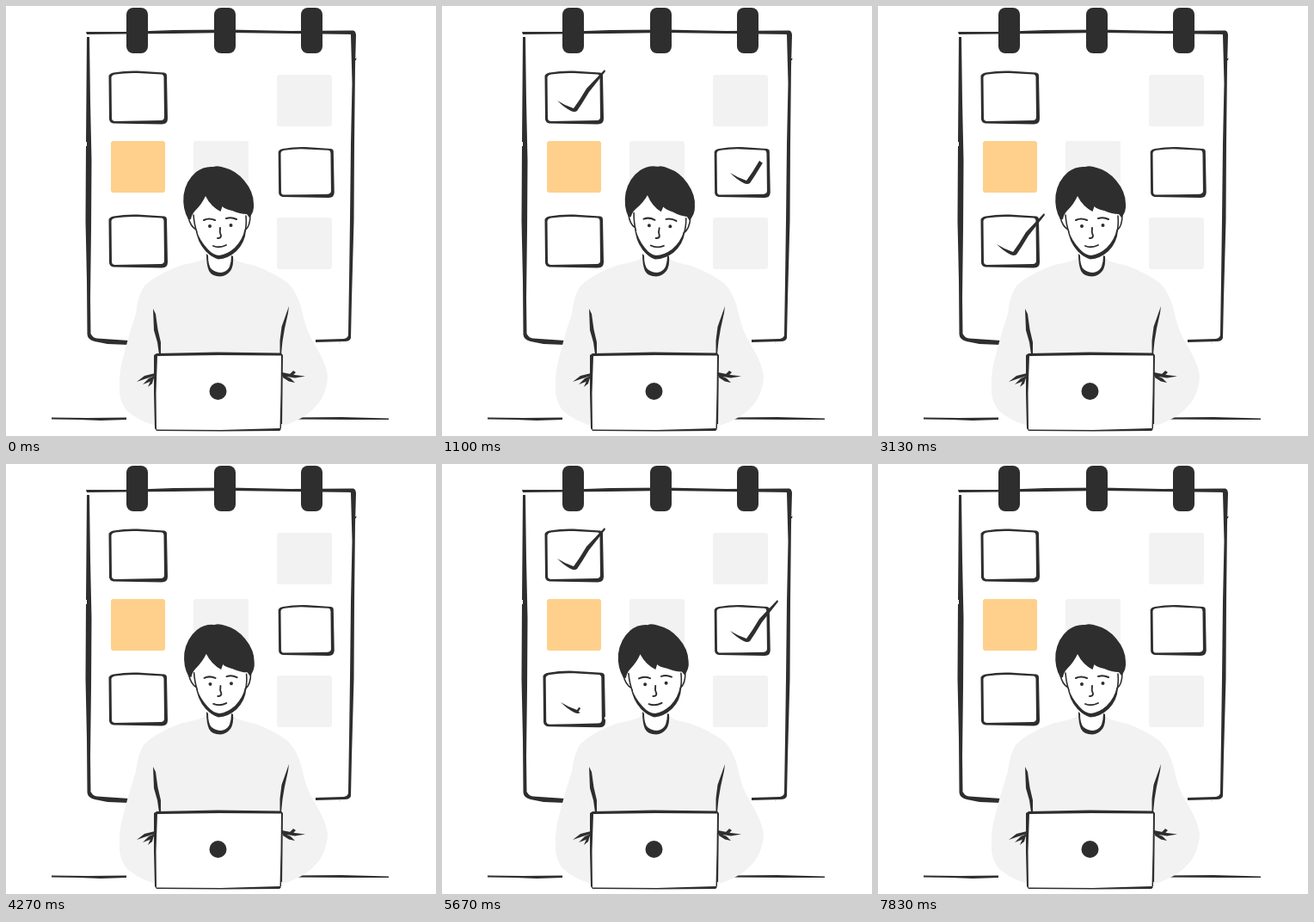
These frames come from a looping animation (500x500 px, 8.23 s). An HTML page:

```html
<!DOCTYPE html>
<html lang="en">
<head>
<meta charset="utf-8">
<title>Checklist</title>
<style>
  html, body { margin: 0; width: 100%; height: 100%; overflow: hidden; background: #fff; }
  svg { display: block; width: 100vw; height: 100vh; }
  .ink { fill: #2e2e2e; }
  .pale { fill: #f2f2f2; }
  .white { fill: #fff; }
  .line { fill: none; stroke: #2e2e2e; stroke-width: 2; stroke-linecap: round; stroke-linejoin: round; }
</style>
</head>
<body>
<svg viewBox="0 0 500 500">
  <defs>
    <filter id="rough" filterUnits="userSpaceOnUse" x="0" y="0" width="500" height="500" color-interpolation-filters="sRGB">
      <feTurbulence type="fractalNoise" baseFrequency=".06" numOctaves="2" seed="4"/>
      <feDisplacementMap in="SourceGraphic" scale="1.6" xChannelSelector="R" yChannelSelector="G"/>
    </filter>
    <path id="box" class="ink" fill-rule="evenodd" d="M-33.500-25Q-32-28-28-28.500Q-14-31 0-30.500L31-28.500Q34-28 34-25L35 25Q35 31.500 28 31.500L0 31L-28 30.500Q-32 30-33 26Z
      M-30.500-23Q-30-26-26-26.500Q-14-28.500 0-28L28-26.500Q30.500-26 30.500-23L31 23Q31 27 27 27L0 27.500L-26 28Q-29.500 28-30 25Z"/>
    <path id="check" class="ink" d="M134 110L143 115L153 119L160 109L168 96L189 74L190 76L171 100L163 113L157 122Q154 124 150 122Q142 118 134 110Z"/>
  </defs>

  <!-- board -->
  <g class="ink" filter="url(#rough)">
    <path d="M93 30L140 30L195 28L260 27.500L330 29L403 28.500L406 30V33L330 32L260 31L195 32L140 32.500L94 33Z"/>
    <path d="M94 36H97L98 110L99.500 180L99 260L98 340L98.500 381Q101 386 106 386.500L143 389V394L118 393L103 390Q95 388 94.500 382L94 320L92.500 250L93 160Z"/>
    <path d="M400 30L404 28.500Q407 30 407 34L406 70L405 160L404.500 250L402 340L401 386Q400 390 394 390L360 391V388L393 387Q398 386 398 382L399 320L400 250L401 160L402.500 90L401 34Z"/>
  </g>
  <g class="ink">
    <rect x="140" y="2" width="25" height="53" rx="8"/>
    <rect x="242" y="2" width="25" height="53" rx="8"/>
    <rect x="343" y="2" width="25" height="53" rx="8"/>
  </g>
  <g class="pale">
    <rect x="315" y="80" width="64" height="60" rx="3"/>
    <rect x="218" y="157" width="64" height="60" rx="3"/>
    <rect x="315" y="246" width="64" height="60" rx="3"/>
    <rect x="122" y="157" width="63" height="60" rx="3" fill="#fed08b"/>
  </g>
  <g id="tasks"></g>

  <!-- desk -->
  <path class="ink" filter="url(#rough)" d="M53 478.500L95 479L140 478.500V481L110 482L85 481L53 480.500ZM334 478.500L390 478L445 479.500V481L400 481L334 480.500Z"/>

  <!-- body -->
  <path class="pale" d="M234 292Q228 297 205 301Q172 313 160 327Q153 338 151 358Q144 378 138 402Q131 425 132 442Q131 458 140 470Q153 482 174 488H322Q350 480 365 460Q374 445 374 430Q372 415 358 392Q349 378 344 354Q338 330 325 320Q300 303 277 299Q265 296 263 291Z"/>
  <path class="white" d="M234 280V295Q235 311 249 311Q262 310 263 293V280Z"/>
  <path class="ink" d="M233 288L235 290Q235 302 239 306Q244 310 250 310Q257 309 260 303Q262 297 262 290L264 291Q265 302 261 308Q256 314 249 314.500Q239 314 236 308Q233 301 233 288Z"/>
  <path class="ink" d="M171 352L174 358L176.500 376L180 391L180 405H178L176 391L172 377ZM329 349L328 357L324 375L321.500 390L320 405H318.500L318.500 389L320.500 373Z"/>

  <!-- head -->
  <g id="head">
    <path class="white" d="M211 238L213 249Q215 257 221 260Q224 273 233 283Q240 292 247 292.500Q258 291 266 284Q276 274 278 261Q285 253 284 238L250 215Z"/>
    <path class="line" d="M212 245Q214 256 221 260M218 243Q219 255 222 263M284 243Q284 256 278 261M279 244Q280 254 278 262" style="stroke-width:1.600"/>
    <path class="ink" d="M220 257L222 262Q225 272 234 282Q241 290 248 290Q257 289 266 281Q275 272 277.500 260L279 261Q278 275 268 285Q258 294 247 294.500Q240 293 232 285Q222 274 220 257Z"/>
    <path class="ink" d="M212 248Q205 236 206.500 220Q209 203 221 193Q230 186 241 187Q246 185 254 188Q267 191 277 203Q288 216 288 230Q289 239 283 246L280 242Q272 242 263 238Q254 236 251.500 233L249.500 239Q238 233 232 221Q228 230 220 238Q216 242 215 248Z"/>
    <path class="line" d="M230 249Q236 246 243 249M256 247Q262 245 268 248"/>
    <circle class="ink" cx="237" cy="256" r="2"/>
    <circle class="ink" cx="261.500" cy="255" r="2"/>
    <path class="line" d="M249 258Q248 263 250 267Q250 270 246 270M241 279Q248 282 256 278" style="stroke-width:1.900"/>
  </g>

  <!-- laptop and hands -->
  <path class="white" d="M174 405L322 404L320 492L174 493Z"/>
  <g class="ink" filter="url(#rough)">
    <path fill-rule="evenodd" d="M172 406L175 404L246 402.500L320 403.500L322 406L321.500 450L321 491L318 494L250 494.500L175 494L173 491L172 450ZM176 407L174.500 450L175 492.500L250 493L318.500 491L319.500 450L320 406.500L248 406Z"/>
    <path d="M152 437L161 430L173 427V430L162 433.500ZM159 440L166 433L173 430V432L167 437ZM165 443L168 436L172 432L170 439ZM321 426L336 429L348 430.500L336 432.500L321 430ZM322 429L331 433L336 438L329 436.500L322 432ZM329 429L334 424L337 426L333 430Z"/>
  </g>
  <circle class="ink" cx="246.500" cy="448" r="10"/>
</svg>
<script>
  const LOOP = 8230, HALF = 4100;
  // box centre and scale, tick offset, start of drawing and of erasing
  const tasks = [
    { box: [153, 106, 1, 1], tick: [0, 0], draw: 250, erase: 2100 },
    { box: [348.5, 193, .95, .95], tick: [201, 84], draw: 850, erase: 2700 },
    { box: [153, 273, 1, 1], tick: [4, 167], draw: 1450, erase: 3300 }
  ];
  // head turns: from time, to time, degrees added
  const turns = [[50, 600, 5], [1100, 1750, -7.5], [2300, 2900, 2.5]];

  const root = document.getElementById('tasks');
  const head = document.getElementById('head');
  root.innerHTML = tasks.map(({ tick }, i) => `
    <mask id="m${i}" maskUnits="userSpaceOnUse" x="0" y="0" width="500" height="500">
      <path class="guide" d="M133 109L154 122L191 73" pathLength="100" fill="none"
        stroke="#fff" stroke-width="12" stroke-linejoin="round"/>
    </mask>
    <g filter="url(#rough)"><use class="frame" href="#box"/></g>
    <g transform="translate(${tick})"><g mask="url(#m${i})"><use href="#check"/></g></g>`).join('');
  const guides = root.querySelectorAll('.guide');
  const frames = root.querySelectorAll('.frame');

  const part = (t, a, b) => Math.min(1, Math.max(0, (t - a) / (b - a)));
  const smooth = x => x * x * (3 - 2 * x);

  function render(now) {
    let t = now % LOOP;
    if (t >= HALF) t -= HALF;
    tasks.forEach(({ box: [x, y, sx, sy], draw, erase }, i) => {
      const shown = part(t, draw, draw + 400) - part(t, erase, erase + 400);
      guides[i].setAttribute('stroke-dasharray', `${100 * shown} 300`);
      guides[i].setAttribute('visibility', shown > 0 ? 'visible' : 'hidden');
      const pulse = 1 + .06 * Math.sin(Math.PI * part(t, draw, draw + 220));
      frames[i].setAttribute('transform', `translate(${x} ${y}) scale(${sx * pulse} ${sy * pulse})`);
    });
    const angle = turns.reduce((sum, [a, b, d]) => sum + d * smooth(part(t, a, b)), 0);
    head.setAttribute('transform', `rotate(${angle} 248 300)`);
  }

  const start = performance.now();
  (function tick() {
    render(performance.now() - start);
    requestAnimationFrame(tick);
  })();
</script>
</body>
</html>
```
